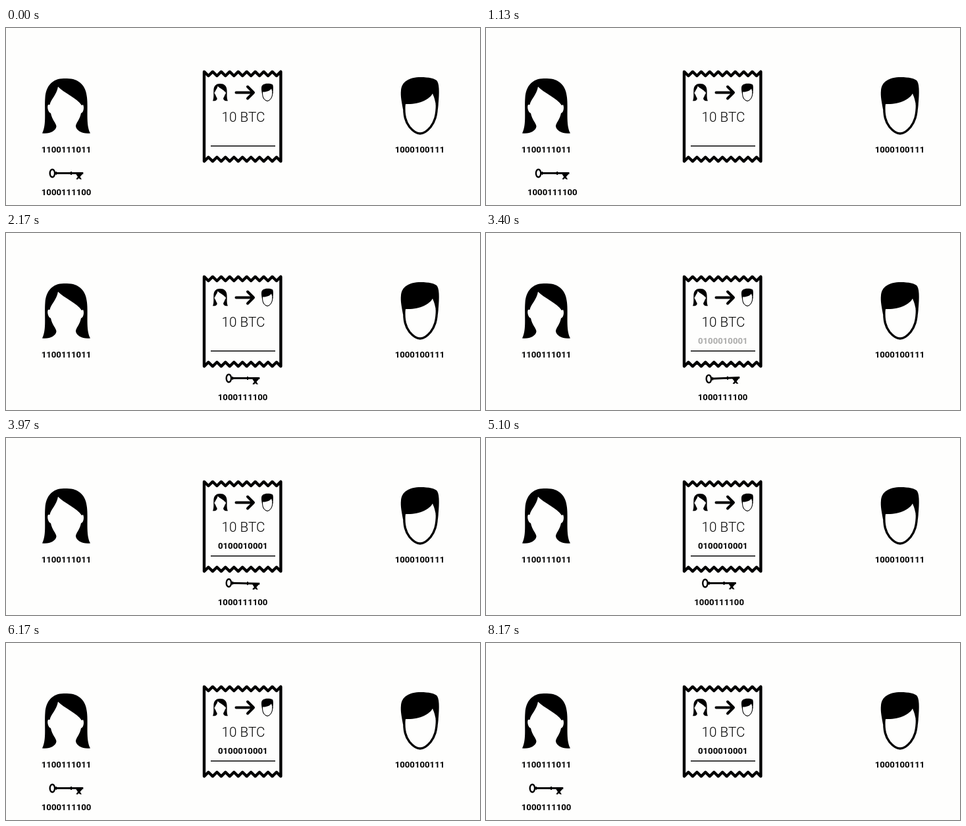
These frames come from a looping animation (720 px wide and 270 px high, 9110 ms). An HTML page:

```html
<!DOCTYPE html>
<html lang="en">
<head>
<meta charset="utf-8">
<title>Signing a payment</title>
<style>
  html, body { margin: 0; width: 100%; height: 100%; overflow: hidden; background: #fefefd; }
  svg { display: block; width: 100%; height: 100%; }
  text { font: 700 13.2px Roboto, "Liberation Sans", sans-serif; text-anchor: middle; }
  .amount { font-size: 20.7px; font-weight: 300; }
  .line { fill: none; stroke: #000; stroke-linejoin: round; }
</style>
</head>
<body>
<svg viewBox="0 0 720 270">
  <defs>
    <path id="woman" d="M90 77C72 76 61 87 59.5 106C58 124 62 148 55 160.5C66 162 76 157 76.5 150C76 145 70 140 68 130
      C64 129 62 120 64 117L66.5 117C68 109 77 102 79 89.5C88 99 108 107 115 118L117 117C119 120 118 129 114 130
      C112 140 106 145 106 150C107 157 117 162 128 160.5C121 148 125 124 123 106C121.5 87 110 76 90 77Z"/>
    <g id="man">
      <path class="line" stroke-width="3.4" d="M605 116C604 134 607 143 613 151C618 157 623 161 629 161
        S640 157 645 151C651 143 654.5 134 654.5 116"/>
      <path d="M603 124C601 112 599 104 600 95C601 82 612 75 630 75C642 75 652 77 655 81C659 88 658 104 656 124
        L653.5 124C653 114 651 107 648 100C643 109 628 117 607 116C606 118 605.5 121 606 125Z"/>
    </g>
  </defs>

  <use href="#woman"/>
  <text x="91.5" y="189.8">1100111011</text>
  <use href="#man"/>
  <text x="628.5" y="189.8">1000100111</text>

  <path id="receipt" class="line" stroke-width="4.4"/>
  <use href="#woman" transform="translate(325.5 98) scale(.315) translate(-91.5 -118.5)"/>
  <use href="#man" transform="translate(397 98.5) scale(.31) translate(-629 -119.5)"/>
  <path class="line" stroke-width="4" stroke-linecap="round"
    d="M349.5 98.5H375M367 89.5L376 98.5L367 107.5"/>
  <text class="amount" x="360.5" y="142.6">10 BTC</text>
  <text id="signature" x="359.8" y="169.3">0100010001</text>
  <path class="line" stroke-width="1.6" d="M311 180H409"/>

  <g id="carried">
    <g id="key">
      <ellipse class="line" stroke-width="2.4" cx="70.4" cy="221.6" rx="3.7" ry="5.9"/>
      <path class="line" stroke-width="3" d="M74.5 221.6H117.3"/>
      <path class="line" stroke-width="5" d="M75.5 221.6H77M98 221.6H100"/>
      <path d="M106 222.5H116.5L112.5 227L115 231L112 230.5L110.5 229L109 231L106.3 230.5L109 227Z"/>
    </g>
    <text x="91.6" y="255.3">1000111100</text>
  </g>
</svg>
<script>
  const LOOP = 9110, TRAVEL = 268, TEETH = 9;
  const el = id => document.getElementById(id);

  // Receipt with teeth along the top and bottom edges.
  const points = [], half = 116.4 / TEETH / 2;
  for (let i = 0; i <= 2 * TEETH; i++) points.push([301 + i * half, i % 2 ? 73 : 66.7]);
  for (let i = 2 * TEETH; i >= 0; i--) points.push([301 + i * half, i % 2 ? 197 : 203.3]);
  el('receipt').setAttribute('d', 'M' + points.join('L') + 'Z');

  const ease = p => p < .5 ? 2 * p * p : 1 - 2 * (1 - p) ** 2;
  // Progress of a one-second step.
  const step = (t, start) => Math.min(1, Math.max(0, (t - start) / 1000));

  function draw(now) {
    const t = now % LOOP;
    const x = TRAVEL * (ease(step(t, 1000)) - ease(step(t, 5000)));
    const signing = step(t, 3000);
    const angle = -2.5 * Math.sin(signing * 6 * Math.PI);
    el('carried').setAttribute('transform', `translate(${x} 0)`);
    el('key').setAttribute('transform', `rotate(${angle} 92 222)`);
    el('signature').setAttribute('opacity', ease(signing));
    requestAnimationFrame(draw);
  }
  draw(performance.now());
</script>
</body>
</html>
```
